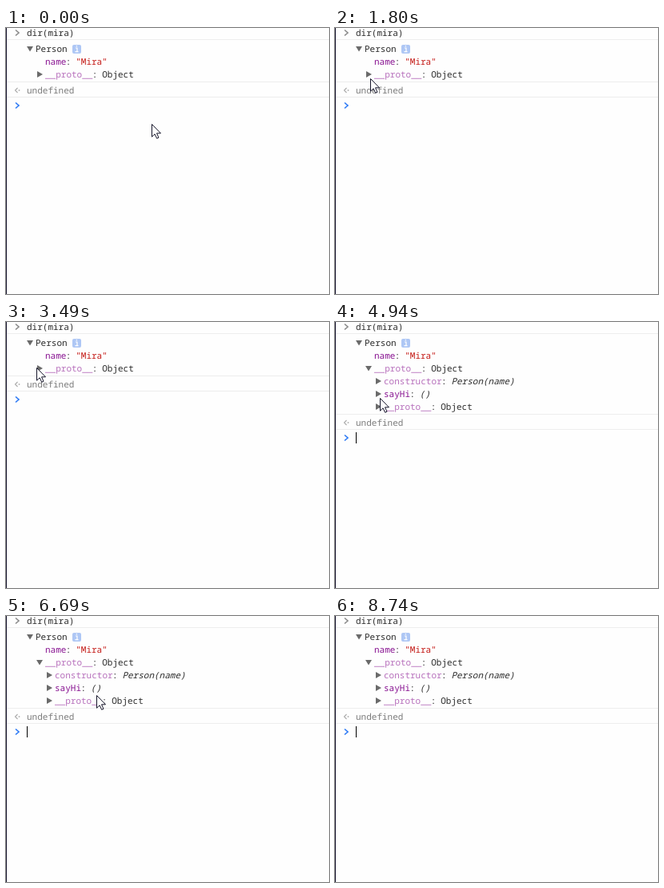
Recreate the animation shown at these times as an HTML page. Size 404 px wide and 333 px high, loop 8.84 s.

```html
<!DOCTYPE html>
<html lang="en">
<head>
<meta charset="utf-8">
<title>Console: inspecting a prototype</title>
<style>
html, body { margin: 0; width: 100%; height: 100%; overflow: hidden; background: #fefefe; }
svg { display: block; }
text {
  font: 11px "Noto Sans Mono", "DejaVu Sans Mono", monospace;
  text-rendering: geometricPrecision;
  fill: #2c2c2c;
}
.key { fill: #881391; }
.dim { fill: #881391; fill-opacity: .6; }
.str { fill: #c41a16; }
.fn { font-style: italic; }
.grey { fill: #7c7c7c; }
.tri { fill: #6a6a6a; }
.rule { fill: #ededed; }
.mark { fill: none; stroke-width: 1.6; }
</style>
</head>
<body>
<svg width="404" height="333" viewBox="0 0 404 333">
  <defs>
    <path id="right" class="tri" d="M0-4 7 0 0 4Z"/>
    <path id="down" class="tri" d="M0-3H8L4 3.5Z"/>
    <path id="chevron" class="mark" d="M0-3.5 4 0 0 3.5"/>
  </defs>
  <rect width="404" height="333" fill="#fefefe"/>
  <rect width="1" height="333" fill="#17142e"/>

  <use href="#chevron" x="12" y="6" stroke="#8a8a8a"/>
  <text x="26" y="10">dir(mira)</text>
  <rect class="rule" x="1" y="14" width="403" height="1"/>

  <use href="#down" x="26" y="26"/>
  <text x="37" y="30">Person</text>
  <rect x="83" y="21" width="11" height="11" rx="2" fill="#aec7f5"/>
  <path d="M87 25h2v5M86.5 29.7h4M87.7 22.6h1.4" fill="none" stroke="#fff" stroke-width="1.2"/>

  <g id="own"></g>
  <use id="closed" href="#right" x="39" y="58"/>
  <use id="opened" href="#down" x="38" y="58"/>
  <g id="children"></g>

  <g id="below">
    <rect class="rule" x="1" y="115" width="403" height="1"/>
    <path d="M14.5 123 11.5 126 14.5 129" fill="none" stroke="#aaa" stroke-width="1.1"/>
    <rect x="15.7" y="125.2" width="1.6" height="1.6" fill="#aaa"/>
    <text x="26" y="130" class="grey">undefined</text>
    <rect class="rule" x="1" y="134" width="403" height="1"/>
    <use href="#chevron" x="12" y="145" stroke="#2b78f5"/>
    <rect id="caret" x="26" y="138" width="1" height="14" fill="#000"/>
  </g>

  <path id="pointer" d="M.5.5V16.2L4.1 12.8 6.7 18.3 9 17.2 6.5 11.8H11.5Z" fill="#fff" stroke="#15152a"/>
</svg>
<script>
const LOOP = 8840, OPEN = 3660, BLINK = 504, STEP = 90;
const CHAR = 6.6, LINE = 16, INDENT = 12;

const el = id => document.getElementById(id);
const show = (id, on) => el(id).setAttribute("visibility", on ? "visible" : "hidden");
const move = (id, x, y) => el(id).setAttribute("transform", `translate(${x} ${y})`);

// One "key: value" line of the object tree
function property(line, depth, key, keyClass, value, valueClass = "") {
  const x = 49 + depth * INDENT, end = x + key.length * CHAR, y = 46 + line * LINE;
  const arrow = depth ? `<use href="#right" x="${x - 10}" y="${y - 4}"/>` : "";
  el(depth ? "children" : "own").innerHTML += `${arrow}<text y="${y}">
    <tspan x="${x}" class="${keyClass}">${key}</tspan><tspan x="${end - 0.6}">:</tspan>
    <tspan x="${end + 11.8}" class="${valueClass}">${value}</tspan></text>`;
}
property(0, 0, "name", "key", '"Mira"', "str");
property(1, 0, "__proto__", "dim", "Object");
property(2, 1, "constructor", "dim", "Person(name)", "fn");
property(3, 1, "sayHi", "key", "()", "fn");
property(4, 1, "__proto__", "dim", "Object");

// Pointer glides: when it leaves, when it arrives, and where
const home = [182, 120];
const glides = [
  { leave: 380, arrive: 1000, to: [54, 49] },
  { leave: 1430, arrive: 1800, to: [44, 63] },
  { leave: 2070, arrive: 2890, to: [156, 67] },
  { leave: 2990, arrive: 3490, to: [38, 57] },
  { leave: 3930, arrive: 4290, to: [22, 80] },
  { leave: 4380, arrive: 4930, to: [56, 95] },
  { leave: 5030, arrive: 5490, to: [45, 94] },
  { leave: 5590, arrive: 5680, to: [122, 93] },
  { leave: 5760, arrive: 5950, to: [74, 95] },
  { leave: 6120, arrive: 6680, to: [113, 99] },
  { leave: 8000, arrive: 8470, to: [341, 335] }
];

const smooth = u => u * u * (3 - 2 * u);

// The pointer is redrawn in steps, the first one as it leaves
function pointerAt(t) {
  let at = home;
  for (const { leave, arrive, to } of glides) {
    if (t < leave) break;
    const count = Math.round((arrive - leave) / STEP) + 1;
    const gap = (arrive - leave) / (count - 1);
    const step = Math.min(count, Math.floor((t - leave) / gap) + 1);
    const u = smooth(step / count);
    at = at.map((a, k) => Math.round(a + (to[k] - a) * u));
    if (step < count) break;
  }
  return at;
}

function draw(t) {
  const open = t >= OPEN;
  show("closed", !open);
  show("opened", open);
  show("children", open);
  move("below", 0, open ? 0 : -3 * LINE);
  show("caret", open && Math.floor((t - OPEN) / BLINK) % 2 === 0);
  move("pointer", ...pointerAt(t));
}

const begin = performance.now();
function tick() {
  draw((performance.now() - begin) % LOOP);
  requestAnimationFrame(tick);
}
tick();
</script>
</body>
</html>
```
